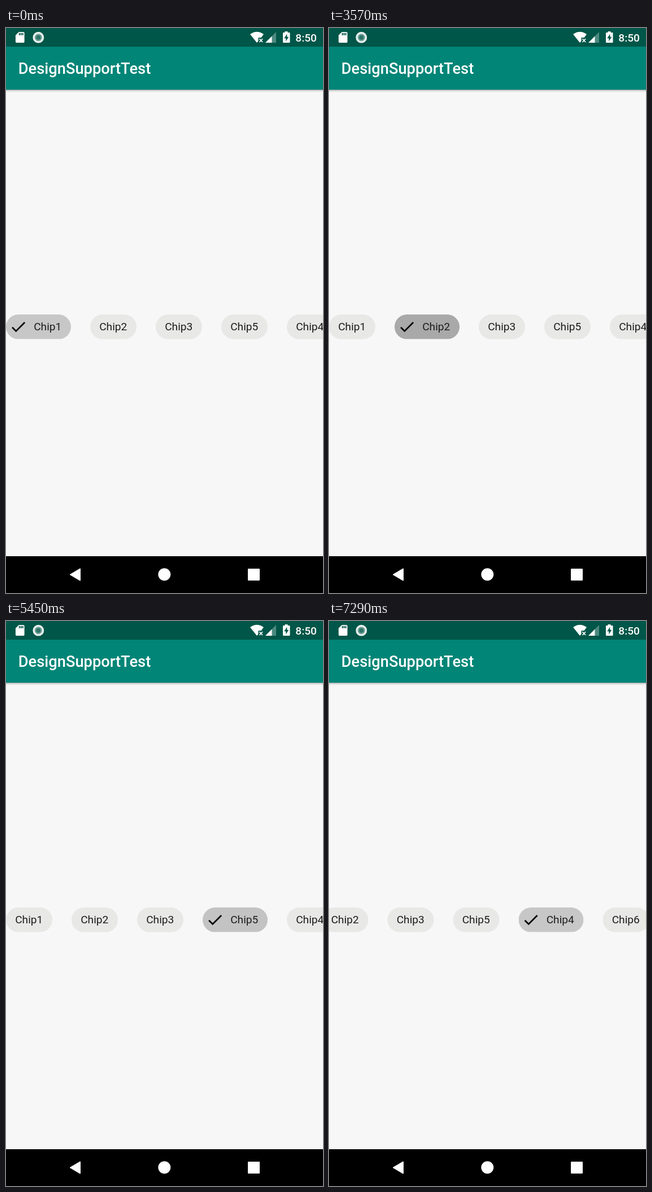
These frames come from a looping animation (561 px wide and 998 px high, 8000 ms). An HTML page:

```html
<!DOCTYPE html>
<html lang="en">
<head>
<meta charset="utf-8">
<title>Chips</title>
<style>
  html, body { margin: 0; width: 100%; height: 100%; overflow: hidden; background: #f7f7f7; }
  svg { display: block; width: 561px; height: 998px; font-family: Roboto, sans-serif; }
  .medium { font-weight: 500; fill: #fff; }
  .label { font-size: 19.1px; fill: #1c1c1c; }
</style>
</head>
<body>
<svg viewBox="0 0 561 998">
  <defs>
    <linearGradient id="shade" x2="0" y2="1">
      <stop offset="0" stop-color="#000" stop-opacity=".32"/>
      <stop offset=".4" stop-color="#000" stop-opacity=".1"/>
      <stop offset="1" stop-color="#000" stop-opacity="0"/>
    </linearGradient>
    <clipPath id="pill"><rect width="115" height="43.6" rx="21.8"/></clipPath>
  </defs>
  <rect width="561" height="998" fill="#f7f7f7"/>

  <!-- app bar -->
  <rect y="109" width="561" height="5" fill="url(#shade)"/>
  <rect y="32" width="561" height="77" fill="#008577"/>
  <text class="medium" x="21.8" y="81.3" font-size="27.27">DesignSupportTest</text>

  <!-- status bar -->
  <rect width="561" height="33" fill="#005648"/>
  <path transform="translate(13 5) scale(.98 .96)" fill="#fff" fill-rule="evenodd" d="M18 2h-8L4 8v12c0 1.1.9 2 2 2h12c1.1 0 2-.9 2-2V4c0-1.1-.9-2-2-2zM12 8h-2V4h2zM15 8h-2V4h2zM18 8h-2V4h2z"/>
  <circle cx="57.3" cy="16.7" r="8.2" fill="#6fa097" stroke="#e9f1ef" stroke-width="3.4"/>
  <circle cx="57.3" cy="16.7" r="4" fill="#2f7468"/>
  <path fill="#fff" d="M432 11Q444 2.500 456 11L451.500 17H446.500V22.900L444 26z"/>
  <path stroke="#fff" stroke-width="1.8" d="M448.500 19l5.600 6m0-6l-5.600 6"/>
  <path fill="#fff" fill-opacity=".3" d="M459 26L478 7V26z"/>
  <path fill="#fff" d="M459 26L470.500 14.500V26z"/>
  <path fill="#fff" d="M493.500 8V6h5v2h3q1 0 1 1v16q0 1-1 1h-10.500q-1 0-1-1v-16q0-1 1-1z"/>
  <path fill="#005648" d="M497.300 10.500L492.300 18.300h3v5.200l5-7.800h-3z"/>
  <text class="medium" x="512.300" y="23.800" font-size="19.1">8:50</text>

  <!-- chips -->
  <g id="row">
    <g id="pills" fill="#e8e8e7"></g>
    <g id="mark">
      <g clip-path="url(#pill)">
        <rect width="115" height="43.6" fill="#c7c7c7"/>
        <rect id="wash" width="115" height="43.6"/>
        <circle id="ripple" cy="21.8"/>
      </g>
      <path transform="translate(5.45 5.45) scale(1.3636)" d="M9 16.170L4.830 12l-1.420 1.410L9 19 21 7l-1.410-1.410z"/>
    </g>
    <g id="labels"></g>
  </g>

  <!-- navigation bar -->
  <rect y="933" width="561" height="65"/>
  <g fill="#fff" stroke="#fff" stroke-width="2" stroke-linejoin="round">
    <path d="M114 965.500L131 955.500V975.500z"/>
    <circle cx="280.300" cy="965.200" r="10"/>
    <rect x="429" y="956" width="19" height="19"/>
  </g>
</svg>
<script>
const LOOP = 8000, TOP = 506, STEP = 116, CHECK = 33, ALPHA = 0.118;
const names = [1, 2, 3, 5, 4, 6].map(n => 'Chip' + n);
const $ = id => document.getElementById(id);

// at: touch time, x: touch point in the chip, hold: time until the ripple fades
const taps = [
  { at: 3260, chip: 1, x: 60, hold: 150 },
  { at: 3970, chip: 2, x: 60, hold: 150 },
  { at: 4870, chip: 3, x: 60, hold: 150 },
  { at: 5680, chip: 4, x: 40, hold: 150 },
  { at: 6430, chip: 4, x: 12.5, hold: 370 }
];

const ramp = (t, a, b) => Math.min(1, Math.max(0, (t - a) / (b - a)));
const smooth = p => p * p * (3 - 2 * p);

function add(parent, tag, attrs) {
  const el = document.createElementNS('http://www.w3.org/2000/svg', tag);
  for (const k in attrs) el.setAttribute(k, attrs[k]);
  return $(parent).appendChild(el);
}

const chips = names.map(name => {
  const pill = add('pills', 'rect', { y: TOP, width: 82, height: 43.6, rx: 21.8 });
  const label = add('labels', 'text', { y: 534.4, class: 'label' });
  label.textContent = name;
  return { pill, label };
});

function drawRipple(tap, t) {
  const age = tap ? t - tap.at : 0;
  const grow = ramp(age, 0, 200);
  const level = tap ? ALPHA * ramp(age, 40, 100) * (1 - ramp(age, tap.hold, tap.hold + 480)) : 0;
  const x = tap ? tap.x : 0;
  $('wash').setAttribute('opacity', level);
  $('ripple').setAttribute('opacity', level);
  $('ripple').setAttribute('cx', x + (57.5 - x) * grow);
  $('ripple').setAttribute('r', 36 + 26 * grow);
}

function draw(t) {
  const tap = taps.filter(p => t >= p.at).pop();
  const picked = tap ? tap.chip : 0;
  const scroll = 134 * smooth(ramp(t, 6060, 6400)) - 5.5 * smooth(ramp(t, 6600, 6950));
  $('row').setAttribute('transform', `translate(${-scroll} 0)`);
  chips.forEach(({ pill, label }, i) => {
    const x = i * STEP + (i > picked ? CHECK : 0);
    pill.setAttribute('x', x);
    pill.setAttribute('visibility', i === picked ? 'hidden' : 'visible');
    label.setAttribute('x', x + 16.2 + (i === picked ? CHECK : 0));
  });
  $('mark').setAttribute('transform', `translate(${picked * STEP} ${TOP})`);
  drawRipple(tap, t);
}

const start = performance.now();
function tick(now) {
  draw(Math.max(0, now - start) % LOOP);
  requestAnimationFrame(tick);
}
draw(0);
requestAnimationFrame(tick);
</script>
</body>
</html>
```
